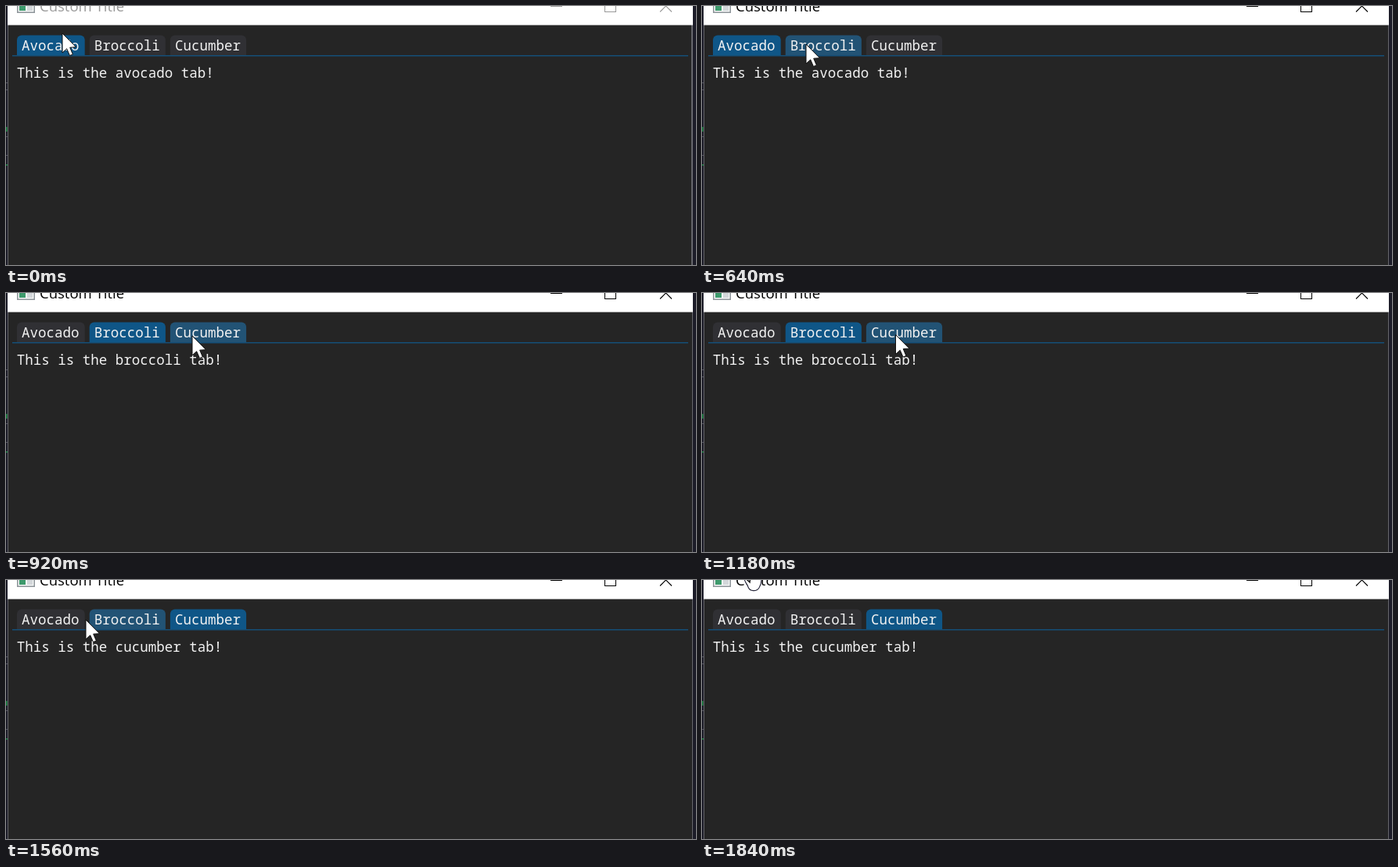
An HTML page with a canvas that plays this animation: 882 px wide and 332 px high, repeating every 2.22 s.

```html
<!DOCTYPE html>
<html lang="en">
<head>
<meta charset="utf-8">
<title>Tab bar demo</title>
<style>
html, body { margin: 0; width: 100%; height: 100%; overflow: hidden; background: #1c1c28; }
canvas { display: block; width: 882px; height: 332px; }
</style>
</head>
<body>
<canvas id="stage" width="882" height="332"></canvas>
<script>
const ctx = document.getElementById('stage').getContext('2d');
const MONO = '17.5px "Noto Sans Mono", "DejaVu Sans Mono", monospace';
const SANS = '18.5px "Open Sans", "Noto Sans", sans-serif';
const IDLE = '#303034', ACTIVE = '#0f5687', HOVER = '#225375', INK = '#f2f2f2';

// The screen updates in beats; all timing below is in beats.
const LOOP = 2220, FRAME = 20, BEAT = 131.4, LEAD = 18;
const FOCUS = 4, END = 14;
const HOVER_LAG = 0.45;

// The pointer eases between these stops.
const STOPS = [
  { at: 0, x: 72, y: 35 },
  { at: 3, x: 90, y: 49 },
  { at: 5, x: 133, y: 49 },
  { at: 7, x: 238, y: 55 },
  { at: 8, x: 256, y: 55 },
  { at: 10, x: 239, y: 52 },
  { at: 12, x: 102, y: 51 },
  { at: END, x: 55, y: 1 }
];

const TAB_TOP = 37.5, TAB_BOTTOM = 63;
const TABS = [
  { name: 'Avocado', opens: 0 },
  { name: 'Broccoli', opens: 6 },
  { name: 'Cucumber', opens: 10 }
];
let nextX = 14;
for (const tab of TABS) {
  tab.x = nextX;
  tab.w = tab.name.length * 10.5 + 13.2;
  nextX += tab.w + 6;
}

const lerp = (a, b, p) => a + (b - a) * p;
const smooth = p => p * p * (3 - 2 * p);

function beatAt(ms) {
  const shown = Math.floor((ms % LOOP) / FRAME) * FRAME;
  return Math.min(END, Math.floor((shown + LEAD) / BEAT));
}

function pointerAt(beat) {
  const i = STOPS.findIndex(stop => stop.at >= beat);
  if (i <= 0) return STOPS[0];
  const a = STOPS[i - 1], b = STOPS[i];
  const p = smooth((beat - a.at) / (b.at - a.at));
  return { x: lerp(a.x, b.x, p), y: lerp(a.y, b.y, p) };
}

// Highlighting trails the pointer a little.
function hoveredTab(beat) {
  if (beat < FOCUS) return undefined;
  const { x, y } = pointerAt(beat - HOVER_LAG);
  if (y < TAB_TOP || y > TAB_BOTTOM) return undefined;
  return TABS.find(tab => x >= tab.x && x <= tab.x + tab.w);
}

function box(x, y, w, h, color) {
  ctx.fillStyle = color;
  ctx.fillRect(x, y, w, h);
}

function text(str, x, y, font, color) {
  ctx.font = font;
  ctx.fillStyle = color;
  ctx.fillText(str, x, y);
}

function trace(points) {
  ctx.beginPath();
  for (const [x, y] of points) ctx.lineTo(x, y);
}

function outline(color, width = 1) {
  ctx.strokeStyle = color;
  ctx.lineWidth = width;
  ctx.stroke();
}

function fillWhite() {
  ctx.fillStyle = '#fff';
  ctx.fill();
}

function drawBackdrop() {
  box(0, 0, 882, 332, '#1c1c28');
  for (const y of [98, 107, 167, 191]) box(0, y, 2, 1, '#55555f');
  box(0, 155, 1.5, 6, '#1f8a45');
  box(0, 203, 2, 1.5, '#1f8a45');
}

function drawIcon() {
  box(14, 0, 23, 9, '#8d9499');
  box(15.5, 0, 20, 7.5, '#f4f6f6');
  box(17, 0, 8, 6, '#3d9a6c');
  box(27, 0, 7, 6, '#d3d7da');
}

function drawWindow(focused) {
  const ink = focused ? '#000' : '#999';
  const edge = focused ? 1 : 2;
  box(2, 0, 876, 332, '#252525');
  box(2, 24, 1, 308, '#66666c');
  box(878 - edge, 24, edge, 308, '#66666c');
  box(2, 0, 876, 24.5, '#fff');

  drawIcon();
  text('Custom Title', 43, 7, SANS, ink);
  box(696, 0, 15, 1, ink);
  ctx.strokeStyle = ink;
  ctx.lineWidth = 1;
  ctx.strokeRect(765.5, -6.5, 14, 14);
  for (const side of [-7.5, 7.5]) {
    trace([[843.5 - side, -7.5], [843.5 + side, 7.5]]);
    outline(ink, 1.1);
  }
}

function drawTabs(selected, hovered) {
  for (const tab of TABS) {
    ctx.beginPath();
    ctx.roundRect(tab.x, TAB_TOP, tab.w, TAB_BOTTOM - TAB_TOP, [6, 6, 0, 0]);
    ctx.fillStyle = tab === hovered ? HOVER : tab === selected ? ACTIVE : IDLE;
    ctx.fill();
    text(tab.name, tab.x + 6, 57.3, MONO, INK);
  }
  box(8, TAB_BOTTOM, 864, 1.5, '#154f78');
  text(`This is the ${selected.name.toLowerCase()} tab!`, 13.7, 92, MONO, INK);
}

function drawArrow({ x, y }) {
  const tip = [[0, 0], [0, 25], [5.7, 19.8], [9.5, 28.5], [13.4, 27], [9.7, 18.2], [17.5, 17.7]];
  trace(tip.map(([dx, dy]) => [x + dx, y + dy]));
  ctx.closePath();
  fillWhite();
  outline('#111');
}

// Lower part of a hand pointer, cut off by the top edge
function drawHand({ x, y }) {
  ctx.save();
  ctx.translate(x, y);
  ctx.beginPath();
  ctx.moveTo(-1, -3);
  ctx.bezierCurveTo(0, 3, 3, 4, 4, 8);
  ctx.bezierCurveTo(6, 14, 15, 14, 18, 9);
  ctx.bezierCurveTo(20, 6, 21, 3, 21, -3);
  fillWhite();
  outline('#26263a', 1.1);
  trace([[2, -2], [6, 2], [6.5, -2]]);
  outline('#111', 1.5);
  ctx.restore();
}

function draw(ms) {
  const beat = beatAt(ms);
  const pointer = pointerAt(beat);
  drawBackdrop();
  drawWindow(beat >= FOCUS);
  drawTabs(TABS.findLast(tab => tab.opens <= beat), hoveredTab(beat));
  (beat === END ? drawHand : drawArrow)(pointer);
}

const start = performance.now();
function tick() {
  draw(performance.now() - start);
  requestAnimationFrame(tick);
}
tick();
</script>
</body>
</html>
```
